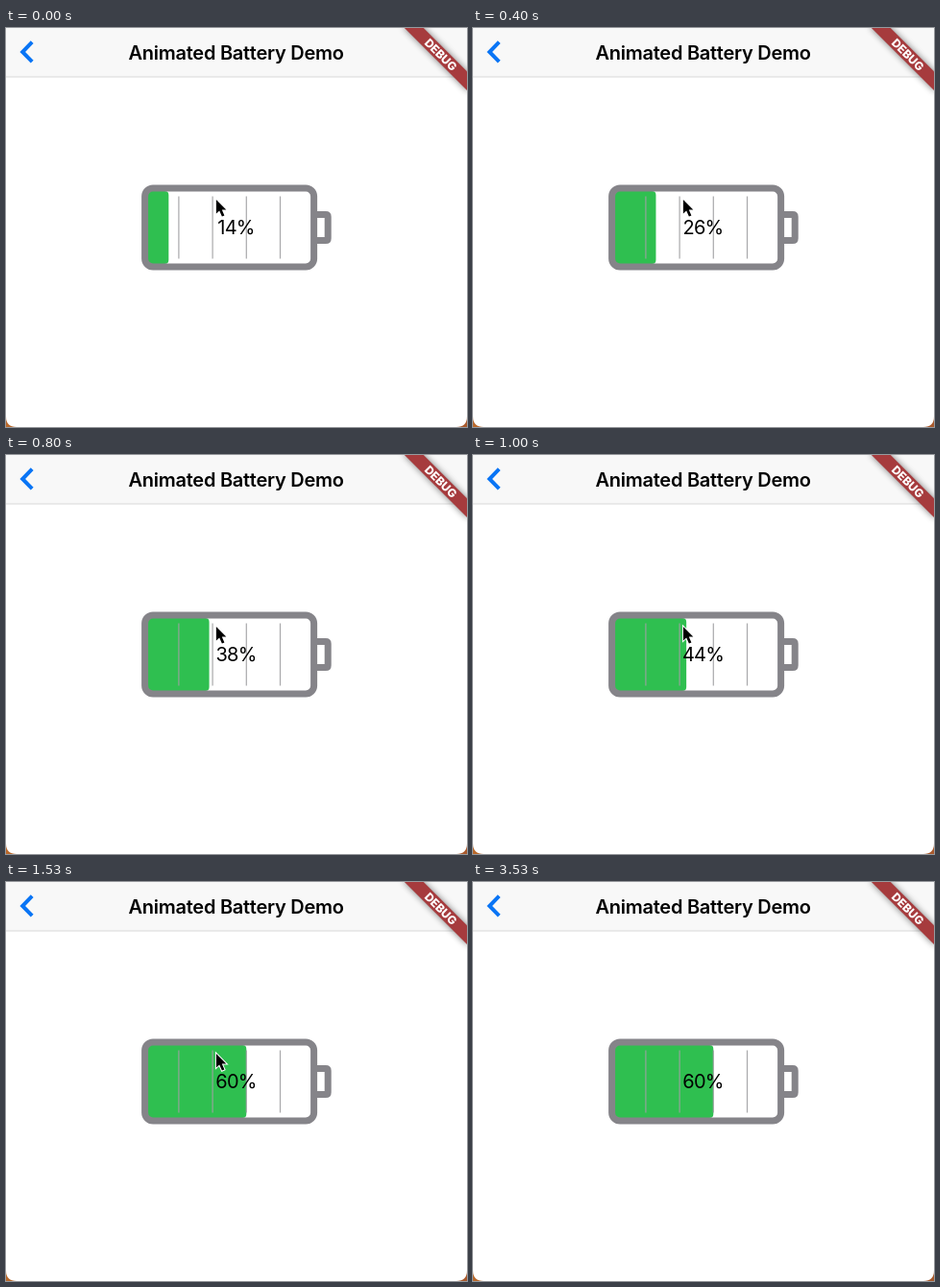
Recreate the animation shown at these times as an HTML page. Size 480 px wide and 416 px high, loop 4.07 s.

```html
<!DOCTYPE html>
<html lang="en">
<head>
<meta charset="utf-8">
<title>Animated Battery Demo</title>
<style>
  html, body { margin: 0; width: 100%; height: 100%; overflow: hidden; }
  body { background: linear-gradient(90deg, #b9682a, #a8592c); }
  svg { position: absolute; left: 0; top: 0; display: block; }
  text { font-family: Inter, "Liberation Sans", sans-serif; text-anchor: middle; }
  .title { font-size: 20px; font-weight: 600; letter-spacing: -.25px; }
  .level { font-size: 20px; letter-spacing: -.8px; }
  .tag { font-size: 12px; font-weight: 800; fill: #fff; }
  .case { fill: none; stroke: #858489; stroke-width: 7; }
</style>
</head>
<body>
<svg width="480" height="416" viewBox="0 0 480 416">
  <defs>
    <filter id="soft" x="-30%" y="-100%" width="160%" height="300%">
      <feGaussianBlur stdDeviation="3.6"/>
    </filter>
  </defs>

  <!-- window and navigation bar -->
  <path d="M0 0H480V405Q480 416 469 416H11Q0 416 0 405Z" fill="#fff"/>
  <rect width="480" height="51" fill="#f8f8f8"/>
  <rect y="50.5" width="480" height="1" fill="#d9d9d9"/>
  <path d="M27.2 14.7L17.2 25L27.2 35.2" fill="none" stroke="#0a75f5" stroke-width="4"/>
  <text class="title" x="239.6" y="32.8">Animated Battery Demo</text>

  <!-- battery -->
  <rect id="fill" x="144.7" y="170" height="76" rx="4"/>
  <path id="marks" stroke="#a0a0a2" stroke-opacity=".9" stroke-width="1.2"/>
  <rect class="case" x="144.6" y="167" width="176" height="82" rx="8.5"/>
  <path class="case" d="M321 194.4H332.8Q335.2 194.4 335.2 196.8V219.2Q335.2 221.6 332.8 221.6H321"/>
  <text class="level" id="level" x="239.5" y="215.2"></text>

  <!-- corner ribbon -->
  <g transform="translate(480 0) rotate(45)">
    <rect x="-47" y="32" width="94" height="14" fill="#000" opacity=".5" filter="url(#soft)"/>
    <rect x="-47" y="32" width="94" height="14" fill="#a63b3d"/>
    <text class="tag" x=".4" y="43.3">DEBUG</text>
  </g>

  <path id="pointer" d="M0 0V14.6L3.3 11.6L6 17.6L8.5 16.5L5.9 10.6H10.4Z"
        fill="#000" stroke="#fff" stroke-width="2" paint-order="stroke"/>
</svg>
<script>
  const LOOP = 4070, TICK = 1000 / 15;
  const FIRST = 14, LAST = 60;
  const LEFT = 144.7, PER_CENT = 1.76;
  const get = id => document.getElementById(id);
  const fill = get("fill"), level = get("level"), pointer = get("pointer");

  fill.setAttribute("fill", "#2fbf50");
  get("marks").setAttribute("d", [1, 2, 3, 4]
    .map(n => `M${(LEFT + n * 20 * PER_CENT).toFixed(1)} 175.5V240.5`).join(""));

  // Pointer rests, then leaves quickly through the top right.
  function pointerAt(tick) {
    if (tick < 28) return [218.9, 179];
    if (tick < 29) return [295, 128];
    return tick < 30 ? [450, 17] : null;
  }

  function draw(t) {
    const tick = Math.floor((t + 4) / TICK);
    const percent = Math.min(LAST, FIRST + 2 * tick);
    fill.setAttribute("width", percent * PER_CENT);
    level.textContent = percent + "%";
    const at = pointerAt(tick);
    pointer.style.display = at ? "" : "none";
    if (at) pointer.setAttribute("transform", `translate(${at})`);
  }

  const start = performance.now();
  function frame() {
    draw((performance.now() - start) % LOOP);
    requestAnimationFrame(frame);
  }
  draw(0);
  requestAnimationFrame(frame);
</script>
</body>
</html>
```
